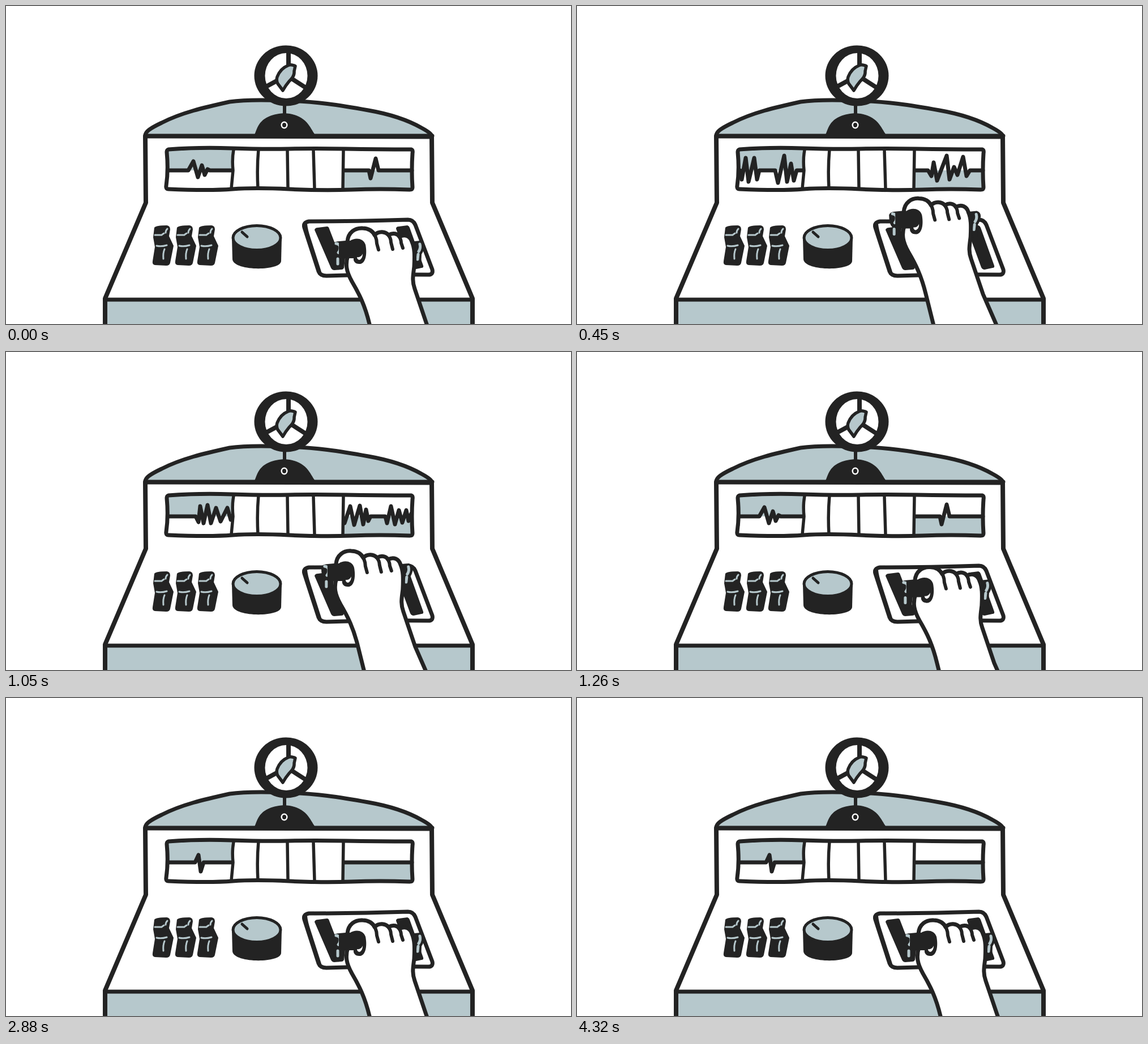
Animation of 998 by 561 pixels, one loop 4950 ms. Source, as an HTML page:

```html
<!DOCTYPE html>
<html lang="en">
<head>
<meta charset="utf-8">
<title>Control panel</title>
<style>
  html, body { margin: 0; width: 100%; height: 100%; overflow: hidden; background: #fff; }
  svg { display: block; width: 100vw; height: 100vh; }
  .line { fill: none; stroke: #232323; stroke-width: 7; stroke-linecap: round; stroke-linejoin: round; }
  .ink { fill: #232323; }
  .blue { fill: #b6c8cc; }
  .white { fill: #fff; }
  .shine { fill: none; stroke: #b6c8cc; stroke-width: 3; stroke-linecap: round; }
</style>
</head>
<body>
<svg viewBox="0 0 998 561">
  <defs>
    <g id="switch">
      <path class="ink" d="M262 391Q265 387 284 387Q290 388 290 394L288 406L296 423L290 453Q289 458 283 458L263 457Q258 456 259 450L263 425L260 408Z"/>
      <path class="shine" d="M263 404L275 404M276 403L279 401M285 393Q282 396 282 400M266 423Q274 425 284 422M280 429Q277 436 278 446"/>
    </g>
  </defs>

  <g id="cabinet">
    <path class="line blue" style="fill:#b6c8cc" stroke-width="8" d="M246 230C245 222 254 216 275 206C310 188 350 179 395 169C430 164 470 166 495 167C545 168 590 175 640 184C680 191 713 203 734 215C747 222 753 227 752 231Z"/>
    <path class="line" d="M246 229H753"/>
    <rect class="blue" x="176" y="519" width="647" height="44"/>
    <path class="line" style="stroke-width:8" d="M246 230L247 347L175 516V570M752 230L753 347L824 516V570"/>
    <path class="line" d="M175 518H824"/>
  </g>

  <g id="wheel">
    <path class="line" style="stroke-width:6" d="M492 172V194"/>
    <path class="ink" d="M437 230C445 222 440 193 491 189C536 191 538 222 549 230Z"/>
    <ellipse cx="491.500" cy="210" rx="4.800" ry="5.300" fill="none" stroke="#fff" stroke-width="2.500"/>
    <ellipse class="ink" cx="494.500" cy="123" rx="56" ry="53.500"/>
    <ellipse class="white" cx="495" cy="123" rx="37.500" ry="40"/>
    <path class="line" style="stroke-width:8" d="M499 80V106M458 143L482 130M506 129L534 147"/>
    <path class="line" style="fill:#b6c8cc;stroke-width:5.500" d="M511 106Q503 102 498 105Q485 110 479 125Q477 131 480 137L489 149Q494 140 500 133Q510 124 509 115Z"/>
  </g>

  <g id="screens">
    <path class="blue" d="M286 253H401L399 290H284ZM597 290H719V322H596Z"/>
    <g id="waves"></g>
    <path class="line" d="M287 253Q340 249 398 251T500 252T600 252T716 253Q719 254 718 260Q716 290 718 320Q718 324 713 324Q660 322 610 324T500 323T400 323T287 323Q282 323 283 317Q287 290 284 258Q284 254 287 253Z"/>
    <path class="line" style="stroke-width:5.500" d="M402 254Q399 270 401 290L398 322M446 253Q443 285 445 322M497 254L498 322M543 255L545 322M596 254L595 322"/>
  </g>

  <use href="#switch"/>
  <use href="#switch" x="40"/>
  <use href="#switch" x="79"/>

  <g id="knob">
    <path class="ink" d="M399 409L400 447C402 468 485 468 486 450L487 409Z"/>
    <ellipse class="line" style="fill:#b6c8cc;stroke-width:5" cx="443" cy="409" rx="42" ry="21.500"/>
    <path class="line" style="stroke-width:5" d="M417 399L426 407"/>
  </g>

  <g id="slots">
    <path class="line" style="fill:#fff" d="M535 380Q620 380 710 377Q719 377 723 386L753 465Q755 474 746 474Q660 473 566 476Q555 476 552 468L527 391Q524 382 535 380Z"/>
    <path class="line" style="stroke-width:4" d="M530 385Q531 395 536 410L555 469"/>
    <path class="ink" d="M545 395Q546 391 551 391L567 389Q570 389 571 393L597 460Q597 465 592 465L580 466Q576 466 574 462Z"/>
    <path class="ink" d="M689 393Q689 389 694 389L709 387Q712 388 713 391L737 458Q738 462 734 462L720 465Q716 465 714 461Z"/>
  </g>

  <g id="lever">
    <path class="ink" d="M577 421Q579 415 589 415L622 412V444L599 445L597 462Q590 467 580 464L583 443Q577 438 577 421Z"/>
    <path class="shine" style="stroke-width:5" d="M583 419Q591 420 590 428Q590 432 587 435M586 446V455"/>
    <path class="ink" d="M712 416L732 414Q739 416 739 424Q738 432 734 438L733 460L716 463Z"/>
    <path class="shine" style="stroke-width:5" d="M731 420Q733 427 729 433M728 438L727 447"/>
    <path class="line" style="fill:#fff" d="M603 416C604 399 617 391 630 392C640 392 648 397 651 404C659 396 670 398 676 404C684 399 692 402 695 407C705 402 714 406 717 416C722 427 722 440 721 460C719 476 717 485 722 499L743 561L771 625L658 625L642 561C634 528 624 508 611 486C601 468 599 456 604 440Z"/>
    <path class="line" style="stroke-width:6" d="M646 398Q655 406 655 419L658 430M673 402Q680 408 680 417L683 429M693 405Q698 411 698 418L701 427"/>
    <path class="ink" d="M588 416L608 414C617 408 631 409 635 421C638 436 636 453 626 455C617 456 613 450 614 445L600 445L588 444Z"/>
    <path class="white" d="M620 443Q627 444 630 437Q630 446 624 448Q620 447 620 443Z"/>
  </g>
</svg>
<script>
const LOOP = 4950, STEP = 30;

// Each trace pair: left screen, right screen.
const traces = {
  calm: [
    "M287 290H322L331 274L339 302L346 281L351 298L356 288L360 290H399",
    "M597 290H641L644 304L653 269L658 290H717"
  ],
  blip: [
    "M287 290H334L340 277L344 306L349 290H399",
    "M597 290H717"
  ],
  burst: [
    "M288 290L291 306L298 268L303 310L313 268L318 306L322 290H350L355 312L366 264L371 310L378 278L383 308L388 290H398",
    "M597 290H620L626 300L630 276L636 308L653 264L658 306L666 284L672 298L682 266L688 300L694 290H717"
  ],
  buzz: [
    "M288 290H335L340 300L343 272L349 302L356 270L362 302L371 275L379 299L391 275L397 296",
    "M598 302L608 272L615 305L625 271L631 304L636 278L640 298L644 290H670L673 302L680 272L687 304L694 279L700 301L707 279L711 298L716 285"
  ]
};

const schedule = [
  [0, "calm"], [240, "burst"], [660, "buzz"], [1140, "calm"], [1440, "blip"],
  [2160, "calm"], [2880, "blip"], [3600, "calm"], [4320, "blip"]
];

const waves = document.getElementById("waves");
const lever = document.getElementById("lever");
const [left, right] = [0, 1].map(() => {
  const path = document.createElementNS("http://www.w3.org/2000/svg", "path");
  path.setAttribute("class", "line");
  return waves.appendChild(path);
});

function ease(t, from, to) {
  const x = Math.min(1, Math.max(0, (t - from) / (to - from)));
  return x * x * (3 - 2 * x);
}

function draw(t) {
  const lift = ease(t, 0, 530) - ease(t, 850, 1440);
  lever.setAttribute("transform", `translate(${-27.5 * lift} ${-56 * lift})`);
  const [, name] = schedule.findLast(([start]) => start <= t);
  left.setAttribute("d", traces[name][0]);
  right.setAttribute("d", traces[name][1]);
}

const begin = performance.now();
function tick(now) {
  const t = Math.max(0, now - begin) % LOOP;
  draw(Math.floor(t / STEP) * STEP);
  requestAnimationFrame(tick);
}
draw(0);
requestAnimationFrame(tick);
</script>
</body>
</html>
```
